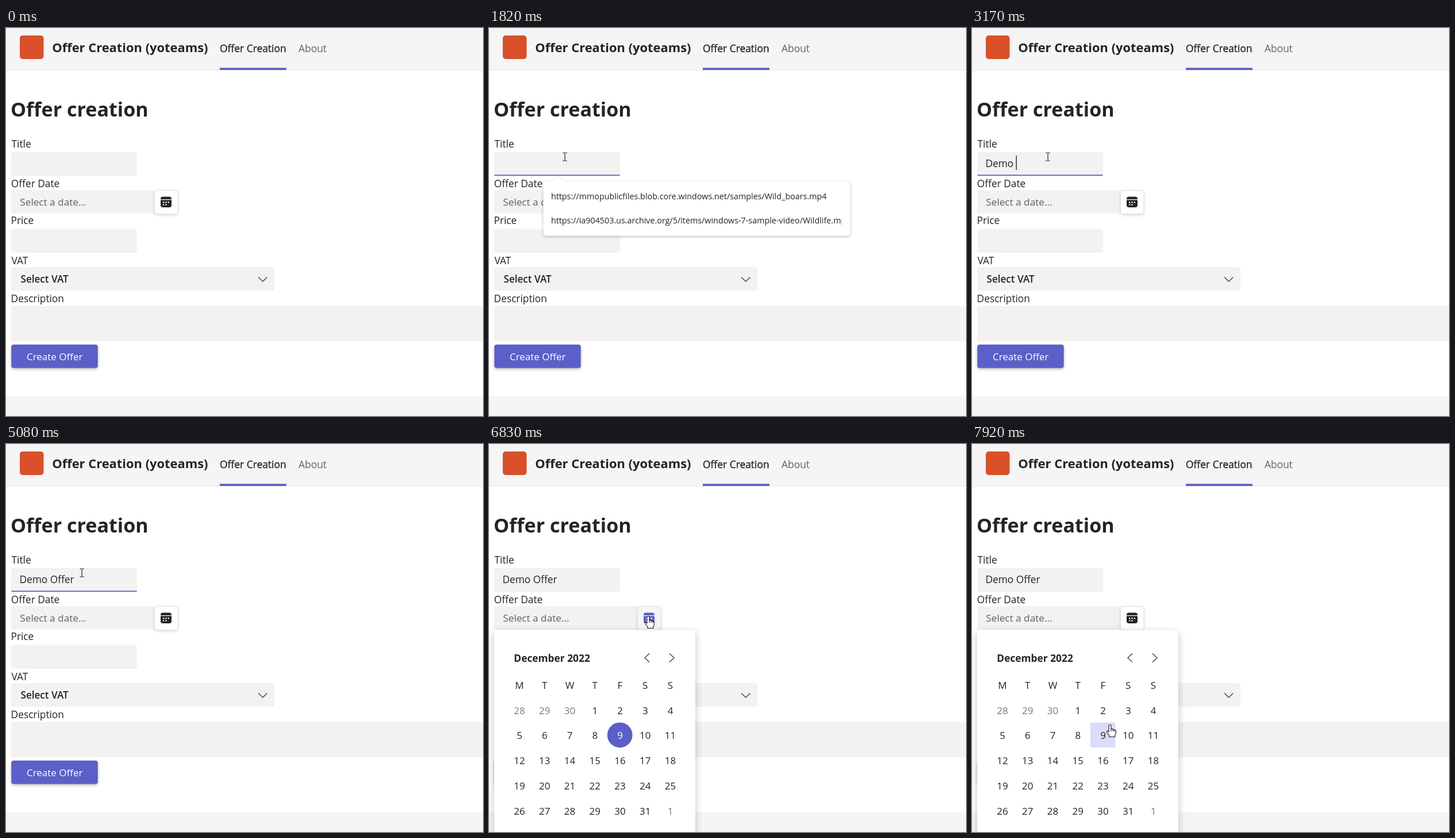
Animation, 830 px wide and 675 px high, one loop 7990 ms. Source, as an HTML page with a canvas:

```html
<!DOCTYPE html>
<html lang="en">
<head>
<meta charset="utf-8">
<title>Offer creation</title>
<style>
html, body { margin: 0; width: 100%; height: 100%; overflow: hidden; background: #fff; }
canvas { display: block; width: 830px; height: 675px; }
</style>
</head>
<body>
<canvas id="stage"></canvas>
<script>
const W = 830, H = 675, LOOP = 7990;
const canvas = document.getElementById('stage');
const ctx = canvas.getContext('2d');
const ratio = window.devicePixelRatio || 1;
canvas.width = W * ratio;
canvas.height = H * ratio;

const FAMILY = '"Open Sans", "Noto Sans", sans-serif';
const INK = '#242424', SOFT = '#616161', FIELD = '#f3f2f1', BAR = '#f5f5f5', BRAND = '#5b5fc7';

// Pointer moves: frame step, then [time, x, y] stops
const MOVES = [
  [70, [260, 597, 537], [330, 430, 412], [400, 300, 326], [470, 252, 306]],
  [72, [598, 252, 306], [742, 210, 272], [886, 146, 228], [958, 133, 220], [1030, 132, 223.5]],
  [70, [5080, 132, 223.5], [5430, 190, 290], [5640, 235, 340], [5710, 245, 347], [5780, 254, 335],
    [5850, 260, 316], [5920, 262, 312], [6130, 266, 309], [6410, 276.5, 299]],
  [70, [7360, 276.5, 299], [7500, 273, 330], [7780, 246, 460], [7850, 241, 482], [7920, 240, 488]]
];
const TITLE = 'Demo Offer';
const KEYS = [2150, 2360, 2640, 2970, 3170, 3630, 3960, 4090, 4350, 4550];
// Times at which the caret turns on and off in turn
const BLINKS = [1300, 1820, 2150, 5080, 5640, 6200];

function text(str, x, y, size = 17.3, color = INK, weight = 400, align = 'left') {
  ctx.font = `${weight} ${size}px ${FAMILY}`;
  ctx.fillStyle = color;
  ctx.textAlign = align;
  ctx.fillText(str, x, Math.round(y));
}

function rect(x, y, w, h, color) {
  ctx.fillStyle = color;
  ctx.fillRect(x, y, w, h);
}

function box(x, y, w, h, color, r = 4) {
  ctx.beginPath();
  ctx.roundRect(x, y, w, h, r);
  ctx.fillStyle = color;
  ctx.fill();
}

function line(points, color, width) {
  ctx.beginPath();
  points.forEach(([x, y]) => ctx.lineTo(x, y));
  ctx.strokeStyle = color;
  ctx.lineWidth = width;
  ctx.stroke();
}

function withShadow(blur, dy, alpha, draw) {
  ctx.save();
  ctx.shadowColor = `rgba(0,0,0,${alpha})`;
  ctx.shadowBlur = blur * ratio;
  ctx.shadowOffsetY = dy * ratio;
  draw();
  ctx.restore();
}

function pointerAt(t) {
  const move = MOVES.filter(m => t >= m[1][0]).pop();
  if (!move) return null;
  const [step, ...stops] = move;
  const start = stops[0][0], last = stops[stops.length - 1];
  const now = start + Math.floor((t - start) / step) * step;
  if (now >= last[0]) return { x: last[1], y: last[2] };
  const i = stops.findIndex(s => s[0] > now);
  const a = stops[i - 1], b = stops[i];
  const k = (now - a[0]) / (b[0] - a[0]);
  return { x: a[1] + (b[1] - a[1]) * k, y: a[2] + (b[2] - a[2]) * k };
}

const inside = (p, x, y, w, h) => !!p && p.x >= x && p.x < x + w && p.y >= y && p.y < y + h;

function header() {
  rect(0, 0, W, 73, BAR);
  rect(0, 73, W, 1, '#e8e8e8');
  box(24, 13, 41.5, 41, '#d9502a', 5);
  text('Offer Creation (yoteams)', 80.3, 42, 21.9, INK, 700);
  text('Offer Creation', 372, 42, 17.4);
  ctx.strokeStyle = INK;
  ctx.lineWidth = 0.35;
  ctx.strokeText('Offer Creation', 372, 42);
  text('About', 509, 42, 17.4, SOFT);
  rect(372, 69.3, 116, 3.7, BRAND);
}

function dateButton(hover, pressed) {
  withShadow(5, 2, 0.16, () => box(258.5, 282.5, 40.5, 41, '#fff'));
  box(258.5, 282.5, 40.5, 41, pressed ? BAR : '#fff');
  ctx.strokeStyle = '#e1dfdd';
  ctx.lineWidth = 1;
  ctx.stroke();
  box(269, 293.5, 19, 18.5, hover ? BRAND : INK, 4);
  rect(269, 298, 19, 1.2, '#fff');
  for (let i = 0; i < 5; i++) {
    ctx.beginPath();
    ctx.arc(274.2 + (i % 3) * 4.3, 303.2 + Math.floor(i / 3) * 4.2, 1.2, 0, 7);
    ctx.fillStyle = '#fff';
    ctx.fill();
  }
}

function form(t, hover, focused) {
  text('Offer creation', 8, 154, 34.1, INK, 700);

  text('Title', 9.5, 208);
  box(9, 216, 219, 41, FIELD);
  if (focused) box(9, 255.2, 219, 1.9, BRAND, [0, 0, 2, 2]);
  const typed = TITLE.slice(0, KEYS.filter(k => t >= k).length);
  text(typed, 23.4, 242);
  if (BLINKS.filter(b => t >= b).length % 2) {
    const x = Math.max(25, 23.4 + ctx.measureText(typed).width);
    rect(Math.round(x) - 0.5, 222, 1.3, 25, '#111');
  }

  text('Offer Date', 8.8, 277);
  box(9, 282, 252, 41, FIELD);
  text('Select a date...', 24.3, 309, 17.2, SOFT);
  dateButton(hover, t >= 6620 && hover);

  text('Price', 8.5, 341);
  box(9, 349.5, 219, 41.5, FIELD);

  text('VAT', 9.5, 411);
  box(9, 416, 458, 41, FIELD);
  text('Select VAT', 25.5, 443, 17.1, INK, 600);
  line([[439.2, 433.4], [446.8, 441], [454.4, 433.4]], '#424242', 1.4);

  text('Description', 8.6, 477);
  box(9, 483.5, 900, 61.5, FIELD);

  withShadow(5, 2, 0.28, () => box(9.3, 550.8, 150.4, 40.8, BRAND));
  text('Create Offer', 36, 578, 17, '#fff');
  rect(0, 641, W, 34, BAR);
}

function suggestions(alpha) {
  if (!alpha) return;
  ctx.save();
  ctx.globalAlpha = alpha;
  withShadow(5, 1.5, 0.27, () => box(94.5, 266.5, 534, 95, '#fff', 5));
  ctx.beginPath();
  ctx.moveTo(110, 267.5);
  ctx.lineTo(121, 258);
  ctx.lineTo(132, 267.5);
  ctx.fillStyle = '#fff';
  ctx.fill();
  line([[110, 266.5], [121, 258], [132, 266.5]], '#e4e4e4', 0.8);
  ctx.beginPath();
  ctx.rect(100, 268, 514, 90);
  ctx.clip();
  text('https://mmopublicfiles.blob.core.windows.net/samples/Wild_boars.mp4', 107.9, 298, 14.32);
  text('https://ia904503.us.archive.org/5/items/windows-7-sample-video/Wildlife.mp4', 107.9, 340, 14.32);
  ctx.restore();
}

function calendar(alpha, hoverDay) {
  if (!alpha) return;
  const left = 53, step = 43.75;
  ctx.save();
  ctx.globalAlpha = alpha;
  withShadow(14, 4, 0.24, () => box(9, 323.5, 350, 400, '#fff'));
  text('December 2022', 43.3, 379, 17.35, INK, 700);
  line([[279, 364.5], [271, 372], [279, 379.5]], '#424242', 1.4);
  line([[314, 364.5], [322, 372], [314, 379.5]], '#424242', 1.4);
  [...'MTWTFSS'].forEach((d, i) => text(d, left + i * step, 426, 17, INK, 400, 'center'));
  for (let i = 0; i < 35; i++) {
    const x = left + (i % 7) * step, y = 463.2 + Math.floor(i / 7) * step;
    const day = i < 3 ? 28 + i : (i - 3) % 31 + 1;
    const other = i < 3 || i > 33;
    const today = i === 11;
    if (today && hoverDay) rect(206, 484.5, 43.5, 43.5, '#dbdcf9');
    else if (today) {
      ctx.beginPath();
      ctx.arc(227.7, 506.3, 21.9, 0, 7);
      ctx.fillStyle = BRAND;
      ctx.fill();
    }
    const color = today && !hoverDay ? '#fff' : other ? '#7a7a7a' : INK;
    text(day, x, y + 6.3, 17, color, 400, 'center');
  }
  ctx.restore();
}

const ARROW = new Path2D('M.5 .5V16.5L4.2 13L6.7 18.5L9 17.5L6.6 12H11.5Z');
const HAND = new Path2D('M-2 2Q-2 .5 0 .5Q2 .5 2 2V7.5Q4.6 6.8 5.2 8.6Q7.4 7.8 8 9.6Q10.4 9 10.4 11.5V15Q10.4 17 8.6 19V21.5H-1V19.5L-5 13.8Q-6 11.8-4.6 11.2Q-3.4 10.8-2 13Z');
const KNUCKLES = new Path2D('M2 7.5V12M5.2 8.6V12M8 9.6V12.5');

function pointer(p, kind) {
  if (!p) return;
  ctx.save();
  ctx.translate(Math.round(p.x), Math.round(p.y));
  ctx.lineJoin = 'round';
  ctx.strokeStyle = '#111';
  ctx.lineWidth = 1.1;
  if (kind === 'text') {
    rect(-0.5, -6.5, 1.2, 13, '#222');
    for (const y of [-7.5, 6.5]) {
      rect(-3.5, y, 3, 1.2, '#222');
      rect(0.7, y, 3, 1.2, '#222');
    }
  } else {
    const shape = kind === 'hand' ? HAND : ARROW;
    ctx.fillStyle = '#fff';
    ctx.fill(shape);
    ctx.stroke(shape);
    if (kind === 'hand') ctx.stroke(KNUCKLES);
  }
  ctx.restore();
}

function fade(t, times, levels) {
  const n = times.filter(s => t >= s).length;
  return n ? levels[n - 1] : 0;
}

function draw(t) {
  const p = pointerAt(t);
  const open = t >= 6620;
  const onButton = inside(p, 258, 282, 41, 41);
  const onDays = open && inside(p, 31, 442, 306, 233);
  const onDay = open && inside(p, 206, 484, 44, 44);
  const onField = inside(p, 9, 216, 219, 41) || inside(p, 9, 282, 249, 41)
    || (!open && inside(p, 9, 350, 219, 41));

  ctx.setTransform(ratio, 0, 0, ratio, 0, 0);
  rect(0, 0, W, H, '#fff');
  header();
  form(t, onButton, t >= 1300 && !open);
  suggestions(fade(t, [1300, 1360, 2220, 2290, 2360], [0.5, 1, 0.6, 0.25, 0]));
  calendar(fade(t, [6620, 6690, 6760, 6830], [0.2, 0.6, 0.9, 1]), onDay);
  pointer(p, onButton || onDays ? 'hand' : onField ? 'text' : 'arrow');
}

let begin;
function tick(now) {
  if (begin === undefined) begin = now;
  draw((now - begin) % LOOP);
  requestAnimationFrame(tick);
}
requestAnimationFrame(tick);
</script>
</body>
</html>
```
